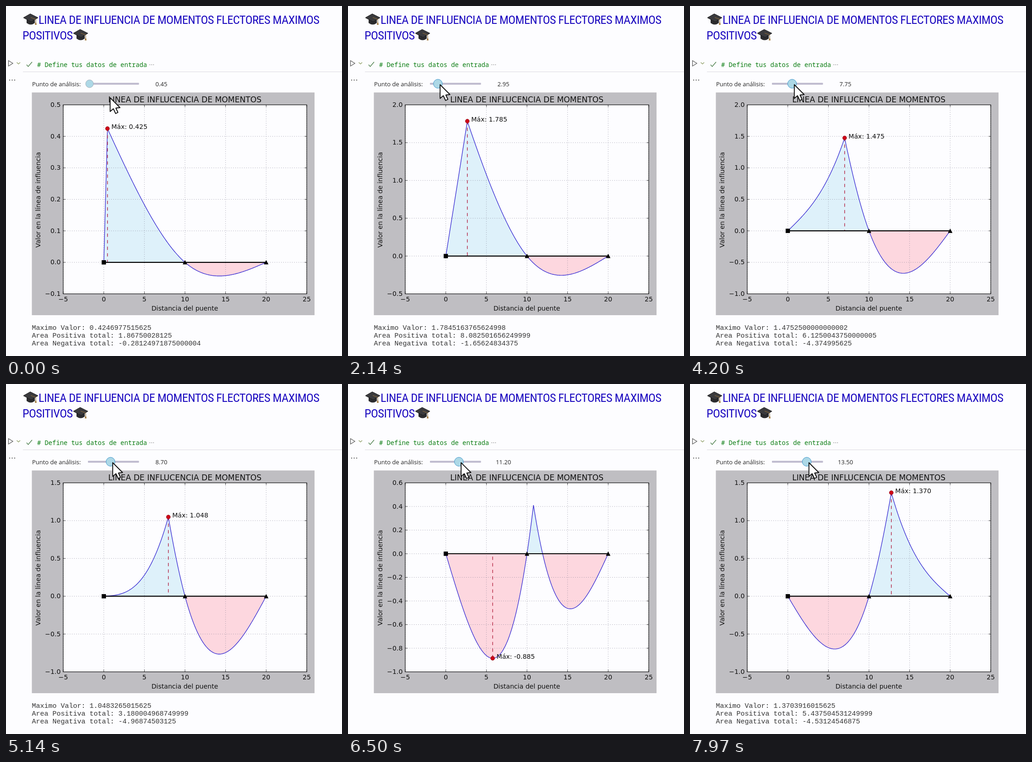
These frames come from a looping animation (734x763 px, 8 s). An HTML page:

```html
<!DOCTYPE html>
<html lang="es">
<head>
<meta charset="utf-8">
<title>Linea de influencia</title>
<style>
  html, body { margin: 0; width: 100%; height: 100%; overflow: hidden; background: #fdfdff; }
  svg { display: block; width: 734px; height: 763px; }
  .heading { font: 26.5px 'Roboto Condensed', Roboto, sans-serif; font-stretch: 75%; letter-spacing: -.64px; fill: #1d0bc0; }
  .code { font: 13.8px 'Noto Sans Mono', 'DejaVu Sans Mono', monospace; fill: #0b7d12; }
  .ui { font: 13px 'Open Sans', 'Noto Sans', sans-serif; fill: #222; }
  .out { font: 15px 'Liberation Mono', monospace; fill: #333; }
  .plot { font: 14.1px 'DejaVu Sans', sans-serif; fill: #111; }
  .title { font-size: 17.16px; }
  .mid { text-anchor: middle; }
  .end { text-anchor: end; }
  .grid { stroke: #77748a; stroke-width: .8; stroke-dasharray: 1.19 3.57; fill: none; }
  .tick { stroke: #111; stroke-width: .8; fill: none; }
</style>
</head>
<body>
<svg viewBox="0 0 734 763">
  <defs>
    <g id="cap">
      <path d="M7 12V21Q16 28 25 21V12Z" fill="#2b2b2e"/>
      <path d="M0 9.5L15 1L32 9.5L17 18.5Z" fill="#3a3a3d" stroke="#1c1c1e"/>
      <path d="M16 9L27 13V22" fill="none" stroke="#8a6b3c" stroke-width="1.2"/>
      <path d="M26 20h2l1 5h-4z" fill="#a07a3e"/>
    </g>
    <g id="track"><rect x="179" y="-2" width="111.500" height="4" rx="1" fill="#bdb9cd"/></g>
  </defs>

  <g class="heading">
    <use href="#cap" x="38" y="16"/>
    <text x="71" y="38.500">LINEA DE INFLUENCIA DE MOMENTOS FLECTORES MAXIMOS</text>
    <text x="36" y="72.500">POSITIVOS</text>
    <use href="#cap" x="147" y="50"/>
  </g>

  <g fill="none" stroke="#555" stroke-width="1.200">
    <path d="M5.500 119V131L15 125Z"/>
    <path d="M23.500 123L27.300 126.500L31 123" stroke="#8a9a60"/>
    <path d="M45 128L48.500 132L57 122" stroke="#4c7f4c" stroke-width="1.400"/>
    <path d="M37 143.500H734" stroke="#dad9de" stroke-width="1"/>
    <path d="M7 161.500h2m3.500 0h2m3.500 0h2" stroke-width="1.800"/>
    <path d="M313.500 128h1.600m2.400 0h1.600m2.400 0h1.600" stroke="#888" stroke-width="1.600"/>
  </g>
  <text class="code" x="68" y="133">#&#160;Define tus datos de entrada</text>

  <text class="ui" x="57" y="175">Punto de análisis:</text>
  <use href="#track" y="169.500"/>
  <circle id="knob" cy="169.500" fill="#add8e6"/>
  <text class="ui mid" id="value" x="339.500" y="175"></text>

  <g class="plot">
    <rect x="56.500" y="188.500" width="617.500" height="485.500" fill="#bfbec2"/>
    <rect x="125" y="215.500" width="532" height="412" fill="#fdfdff"/>
    <g id="chart"></g>
    <rect x="125" y="215.500" width="532" height="412" fill="none" stroke="#111" stroke-width="1.190"/>
    <text class="title mid" x="390.700" y="209.500">LINEA DE INFLUCENCIA DE MOMENTOS</text>
    <text class="mid" x="390.500" y="664">Distancia del puente</text>
    <text class="mid" transform="translate(75 422.500) rotate(-90)">Valor en la línea de influencia</text>
  </g>

  <g class="out" id="report">
    <text x="56.500" y="706"></text>
    <text x="56.500" y="723"></text>
    <text x="56.500" y="740"></text>
  </g>

  <g id="flash">
    <text class="ui" x="57" y="722">Punto de análisis:</text>
    <use href="#track" y="716"/>
    <circle id="knob2" cy="716" r="8.500" fill="#add8e6" stroke="#a3afba"/>
    <text class="ui mid" id="value2" x="339.500" y="722"></text>
    <path d="M61 763V740M214.500 763V740H368.500V763" fill="#efeef2" stroke="#aaa9b0"/>
    <path d="M60.500 740H214.500" stroke="#3b97cf" stroke-width="2"/>
  </g>

  <path id="cursor" d="M0 0V30L7 24L12 34.500L17 32L12.500 22.500L21.500 21.500Z"
        fill="#fff" stroke="#111" stroke-width="1.900" stroke-linejoin="round"/>
</svg>
<script>
const LOOP = 8000, SPAN = 10, TOTAL = 2 * SPAN;
const $ = id => document.getElementById(id);
const lerp = (a, b, u) => a + (b - a) * u;
const snap = v => Math.round(v * 20) / 20;

// time, slider value, plotted point, redraw cycle
const KEYS = [
  [0, .45, .45, .5],
  [750, .45, .45, .95],
  [1300, 1.30, 1.10, 4.06],
  [2940, 4.55, 4.15, 12.6],
  [4200, 7.75, 7.00, 18.6],
  [5140, 8.70, 7.95, 23.6],
  [6500, 11.20, 10.80, 30.18],
  [7970, 13.50, 12.75, 37.6],
  [8000, 13.50, 12.75, 37.7]
];

function stateAt(t) {
  const i = KEYS.findIndex((k, n) => n && t < k[0]);
  const a = KEYS[i - 1], b = KEYS[i];
  const u = (t - a[0]) / (b[0] - a[0]);
  const cycle = lerp(a[3], b[3], u);
  const first = Math.floor(a[3]), count = Math.floor(b[3]) - first;
  const step = count ? (Math.floor(cycle) - first) / count : 0;
  return { value: snap(lerp(a[1], b[1], u)), point: snap(lerp(a[2], b[2], step)), phase: cycle % 1 };
}

// Moment at p for a unit load at x on a beam of two equal spans
function moment(p, x) {
  if (p > SPAN) return moment(TOTAL - p, TOTAL - x);
  const z = x > SPAN ? TOTAL - x : x;
  const support = -z * (SPAN ** 2 - z * z) / (4 * SPAN ** 2);
  const simple = x > SPAN ? 0 : Math.min(x, p) * (SPAN - Math.max(x, p)) / SPAN;
  return simple + support * p / SPAN;
}

function pairSum(list, from = 0, to = list.length) {
  if (to - from < 9) {
    let sum = 0;
    for (let i = from; i < to; i++) sum += list[i];
    return sum;
  }
  const mid = (from + to) >> 1;
  return pairSum(list, from, mid) + pairSum(list, mid, to);
}

function area(ys) {
  return pairSum(ys.slice(1).map((y, i) => .01 * (y + ys[i]) / 2));
}

function axisRange(low, high) {
  const pad = (high - low) * .05;
  low -= pad;
  high += pad;
  const step = [.05, .1, .2, .5, 1].find(s =>
    s >= (high - low) / 9 && Math.floor(low / s) * s + 9 * s >= high);
  return { step, from: Math.floor(low / step), to: Math.ceil(high / step) };
}

const px = x => 213.67 + x * 532 / 30;
const label = (v, digits) => v.toFixed(digits).replace('-', '−');
const path = (d, attrs) => `<path d="${d}" ${attrs}/>`;

function drawChart(p) {
  const ys = Array.from({ length: 2001 }, (_, i) => moment(p, i / 100));
  const peakIndex = ys.reduce((best, y, i) => Math.abs(y) > Math.abs(ys[best]) + 1e-12 ? i : best, 0);
  const peak = ys[peakIndex];
  const { step, from, to } = axisRange(Math.min(...ys), Math.max(...ys));
  const py = y => 627.5 - (y / step - from) / (to - from) * 412;
  const trace = f => 'M' + ys.filter((_, i) => i % 5 === 0)
    .map((y, i) => px(i / 20).toFixed(2) + ' ' + py(f(y)).toFixed(2)).join('L');

  let grid = '', ticks = '', texts = '';
  for (let x = -5; x <= 25; x += 5) {
    grid += `M${px(x)} 627.5V215.5`;
    ticks += `M${px(x)} 627.5v-4.8M${px(x)} 215.5v4.8`;
    texts += `<text class="mid" x="${px(x)}" y="643.5">${label(x, 0)}</text>`;
  }
  for (let n = from; n <= to; n++) {
    const y = py(n * step);
    grid += `M125 ${y}H657`;
    ticks += `M125 ${y}h4.8M657 ${y}h-4.8`;
    texts += `<text class="end" x="119.5" y="${y + 4.5}">${label(n * step, step < .1 ? 2 : 1)}</text>`;
  }

  const zero = py(0), mx = px(peakIndex / 100), my = py(peak);
  const triangle = x => path(`M${px(x)} ${zero - 5}l5 9.500h-10z`, 'fill="#000"');
  $('chart').innerHTML =
    path(trace(y => Math.max(y, 0)) + 'Z', 'fill="#def1fa"') +
    path(trace(y => Math.min(y, 0)) + 'Z', 'fill="#fdd7df"') +
    path(grid, 'class="grid"') + path(ticks, 'class="tick"') +
    path(trace(y => y), 'fill="none" stroke="#4034d4" stroke-width="1.4"') +
    path(`M${mx} ${my}V${zero}`, 'stroke="#b32342" stroke-width="1.4" stroke-dasharray="7.15"') +
    path(`M${px(0)} ${zero}H${px(TOTAL)}`, 'stroke="#000" stroke-width="2.2"') +
    `<rect x="${px(0) - 4.7}" y="${zero - 4.7}" width="9.4" height="9.4" fill="#000"/>` +
    triangle(SPAN) + triangle(TOTAL) +
    `<circle cx="${mx}" cy="${my}" r="4.4" fill="#cf0418" stroke="#7c0713" stroke-width=".7"/>` +
    `<text x="${mx + 8.5}" y="${my + 1}">Máx: ${peak.toFixed(3)}</text>` + texts;

  const lines = [
    'Maximo Valor: ' + peak,
    'Area Positiva total: ' + area(ys.map(y => Math.max(y, 0))),
    'Area Negativa total: ' + area(ys.map(y => Math.min(y, 0)))
  ];
  lines.forEach((line, i) => { $('report').children[i].textContent = line; });
}

const show = (id, on) => $(id).setAttribute('visibility', on ? 'visible' : 'hidden');
let shownPoint = null;

function render(t) {
  const { value, point, phase } = stateAt(t);
  if (point !== shownPoint) drawChart(shownPoint = point);

  const x = 180 + value * 5.556, hover = t > 540;
  const knob = $('knob');
  knob.setAttribute('cx', x);
  knob.setAttribute('r', hover ? 9.7 : 8.5);
  knob.setAttribute('stroke', hover ? '#3d96cc' : '#a3afba');
  $('knob2').setAttribute('cx', x);
  $('value').textContent = $('value2').textContent = value.toFixed(2);

  const u = Math.min(t / 650, 1), ease = u * u * (3 - 2 * u);
  $('cursor').setAttribute('transform', `translate(${lerp(227.5, x + 4.8, ease)} ${lerp(200, 171.5, ease)})`);

  show('report', phase > .28);
  show('flash', phase < .14);
}

const start = performance.now();
function tick() {
  render((performance.now() - start) % LOOP);
  requestAnimationFrame(tick);
}
tick();
</script>
</body>
</html>
```
